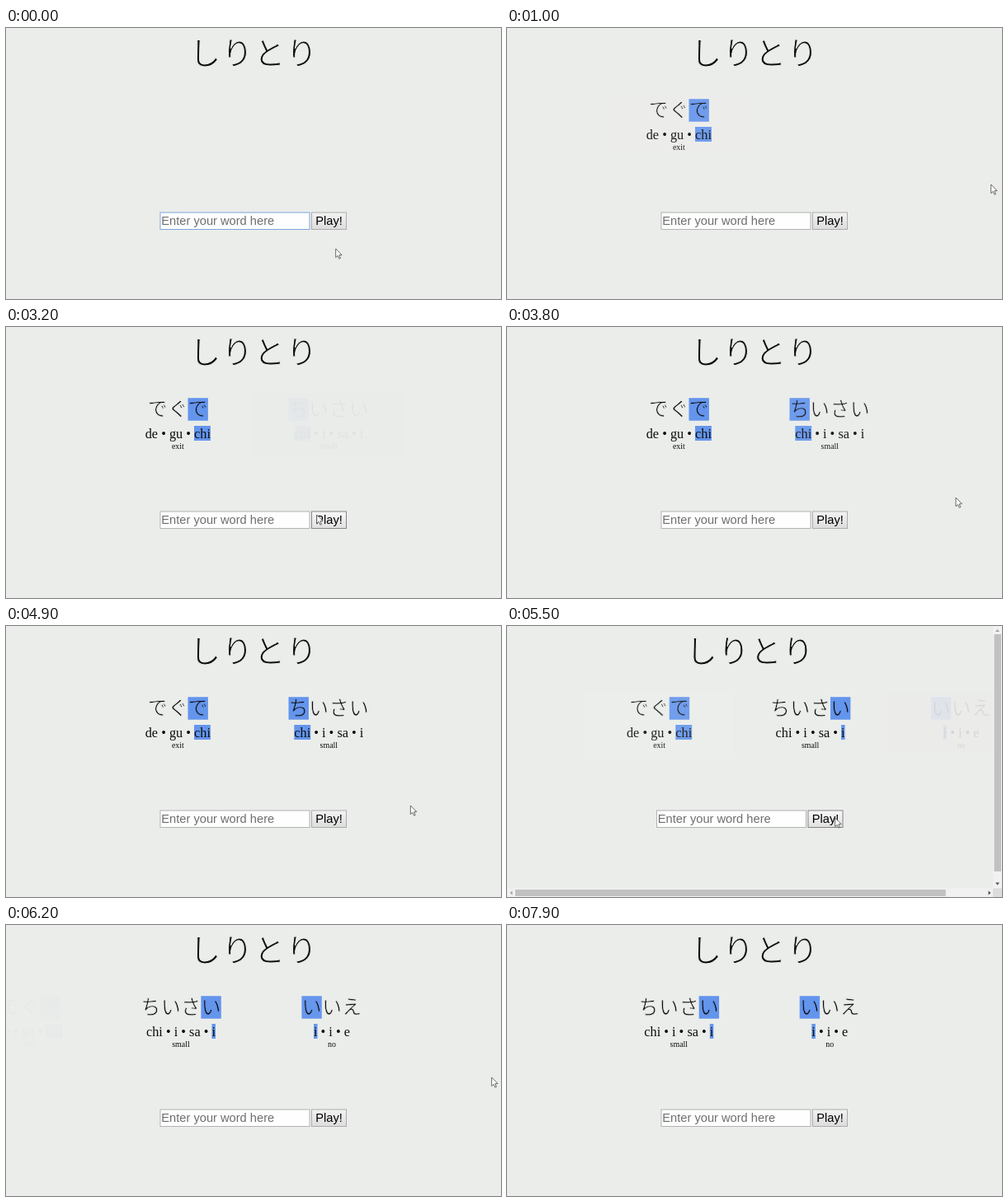
Write an HTML page with a canvas that moves like this. It is 600 by 329 pixels and loops after 8000 ms.

```html
<!DOCTYPE html>
<html lang="ja">
<head>
<meta charset="utf-8">
<style>
  html, body { margin: 0; height: 100%; overflow: hidden; background: #ebedea; }
  canvas { display: block; }
</style>
</head>
<body>
<canvas width="600" height="329"></canvas>
<script>
const ctx = document.querySelector('canvas').getContext('2d');
const LOOP = 8000, FADE = 980, SLOT = 183, SLIDE_AT = 5400;
const PAGE = '#ebedea', INK = '#0c0c0c', MARK = '#6495ed';
const KANA = '"Noto Sans CJK JP", "Noto Sans CJK", sans-serif';
const SERIF = '"Liberation Serif", serif';
const SANS = '14.67px "Liberation Sans", sans-serif';

const words = [
  { kana: 'でぐで', romaji: 'de gu chi', meaning: 'exit', start: 350 },
  { kana: 'ちいさい', romaji: 'chi i sa i', meaning: 'small', start: 3140 },
  { kana: 'いいえ', romaji: 'i i e', meaning: 'no', start: SLIDE_AT },
];

// The pointer rests at each place until the next move begins
const moves = [
  { from: 0, to: 0, x: 400, y: 268 },
  { from: 100, to: 850, x: 587, y: 190 },
  { from: 2200, to: 3000, x: 377, y: 228 },
  { from: 3500, to: 3950, x: 602, y: 200 },
  { from: 4450, to: 5300, x: 398, y: 233 },
  { from: 5520, to: 6100, x: 589, y: 185 },
  { from: 7650, to: 7900, x: 602, y: 185 },
];
const arrowPointer = new Path2D('M0 0V10.6L2.5 8.4L4.2 12.2L5.8 11.5L4.2 7.7L7.4 7.5Z');

const clamp = v => Math.min(1, Math.max(0, v));
const lerp = (a, b, p) => a + (b - a) * p;
const smooth = p => p * p * (3 - 2 * p);

// CSS "ease": cubic-bezier(.25, .1, .25, 1)
function ease(p) {
  p = clamp(p);
  const curve = (u, a, b) => 3 * a * u * (1 - u) ** 2 + 3 * b * u * u * (1 - u) + u ** 3;
  let lo = 0, hi = 1;
  for (let i = 0; i < 20; i++) {
    const mid = (lo + hi) / 2;
    if (curve(mid, .25, .25) < p) lo = mid; else hi = mid;
  }
  return curve(lo, .1, 1);
}

function rect(x, y, w, h, color) {
  ctx.fillStyle = color;
  ctx.fillRect(x, y, w, h);
}

function text(str, x, y, font, color = INK, align = 'left') {
  ctx.font = font;
  ctx.textAlign = align;
  ctx.fillStyle = color;
  ctx.fillText(str, x, y);
}

// Evenly spaced kana; a rim in the backdrop colour thins the strokes
function drawKana(str, cx, cy, pitch, marked = -1) {
  const size = pitch * .97;
  [...str].forEach((char, i) => {
    const x = cx + (i - (str.length - 1) / 2) * pitch;
    const backdrop = i === marked ? MARK : PAGE;
    if (i === marked) rect(x - pitch / 2, cy - 12.5, pitch, 27.5, MARK);
    text(char, x, cy + size * .38, size + 'px ' + KANA, INK, 'center');
    ctx.strokeStyle = backdrop;
    ctx.lineWidth = pitch * .027;
    ctx.lineJoin = 'round';
    ctx.strokeText(char, x, cy + size * .38);
  });
}

function drawRomaji(syllables, cx, marked) {
  const pieces = syllables.split(' ').flatMap((s, i) => i ? [' • ', s] : [s]);
  const font = '16.3px ' + SERIF;
  ctx.font = font;
  const widths = pieces.map(p => ctx.measureText(p).width);
  let x = cx - widths.reduce((a, b) => a + b) / 2;
  pieces.forEach((piece, i) => {
    if (i === marked * 2) rect(x, 120, widths[i], 18, MARK);
    text(piece, x, 134.5, font);
    x += widths[i];
  });
}

function drawWord(word, marked, cx, alpha) {
  if (alpha <= 0) return;
  drawKana(word.kana, cx, 98.7, 24.4, marked);
  drawRomaji(word.romaji, cx, marked);
  text(word.meaning, cx, 148, '9.9px ' + SERIF, INK, 'center');
  // Fade the whole word as one by veiling it with the page colour
  ctx.globalAlpha = 1 - alpha;
  rect(cx - SLOT / 2, 80, SLOT, 75, PAGE);
  ctx.globalAlpha = 1;
}

function drawForm(dx, focused, hovered) {
  const x = 187 + dx;
  rect(x - .5, 223.5, 182, 21.5, focused ? '#7aa5e0' : '#b2b4b2');
  rect(x + .5, 224.5, 180, 19.5, '#fdfefd');
  text('Enter your word here', x + 1.3, 239.2, SANS, '#6e6e6e');

  const face = ctx.createLinearGradient(0, 224, 0, 245);
  face.addColorStop(0, hovered ? '#f8f8f8' : '#f3f3f3');
  face.addColorStop(1, hovered ? '#e0e0e0' : '#dcdcdc');
  rect(x + 183, 223.5, 43, 21.5, hovered ? '#858585' : '#acacac');
  rect(x + 184, 224.5, 41, 19.5, face);
  text('Play!', x + 204.5, 239.2, SANS, '#000', 'center');
}

function drawScrollArrow(x, y, quarterTurns, color) {
  ctx.save();
  ctx.translate(x, y);
  ctx.rotate(quarterTurns * Math.PI / 2);
  ctx.fillStyle = color;
  ctx.fill(new Path2D('M-2.5 1.5H2.5L0 -1.5Z'));
  ctx.restore();
}

function drawScrollbars(contentWidth) {
  rect(589, 0, 11, 329, '#f1f1f1');
  rect(0, 318.5, 600, 10.5, '#f1f1f1');
  rect(589, 318.5, 11, 10.5, '#dcdcdc');
  rect(590.5, 10, 8.5, 288, '#c1c1c1');
  rect(10, 320, 569 * 589 / contentWidth, 8, '#c1c1c1');
  drawScrollArrow(594.5, 5.5, 0, '#a3a3a3');
  drawScrollArrow(585, 324, 1, '#505050');
  drawScrollArrow(594.5, 313, 2, '#505050');
  drawScrollArrow(5, 324, 3, '#a3a3a3');
}

function pointerAt(t) {
  return moves.reduce((at, m) => {
    const p = smooth(clamp((t - m.from) / (m.to - m.from || 1)));
    return { x: lerp(at.x, m.x, p), y: lerp(at.y, m.y, p) };
  }, moves[0]);
}

function drawPointer({ x, y }) {
  ctx.save();
  ctx.translate(x - .3, y);
  ctx.fillStyle = '#fff';
  ctx.fill(arrowPointer);
  ctx.strokeStyle = '#444';
  ctx.lineWidth = .8;
  ctx.stroke(arrowPointer);
  ctx.restore();
}

function draw(t) {
  const slide = ease((t - SLIDE_AT) / FADE);
  const sliding = t >= SLIDE_AT;
  const rightEdge = 300 + (2 - slide) * SLOT;
  const scrolls = sliding && rightEdge > 600;
  const dx = scrolls ? -5.5 : 0;

  rect(0, 0, 600, 329, PAGE);
  drawKana('しりとり', 300 + dx, 29.2, 39);

  const marks = [2, sliding ? 3 : 0, 0];
  words.forEach((word, i) => {
    const alpha = ease((t - word.start) / FADE) * (i ? 1 : 1 - slide);
    drawWord(word, marks[i], 299.8 + dx + (i - .5 - slide) * SLOT, alpha);
  });

  const pointer = pointerAt(t);
  const hovered = Math.abs(pointer.x - dx - 391.5) < 21 && Math.abs(pointer.y - 234) < 11;
  drawForm(dx, t < words[0].start, hovered);
  if (scrolls) drawScrollbars(rightEdge + dx);
  drawPointer(pointer);
}

function tick() {
  draw(performance.now() % LOOP);
  requestAnimationFrame(tick);
}
tick();
</script>
</body>
</html>
```
